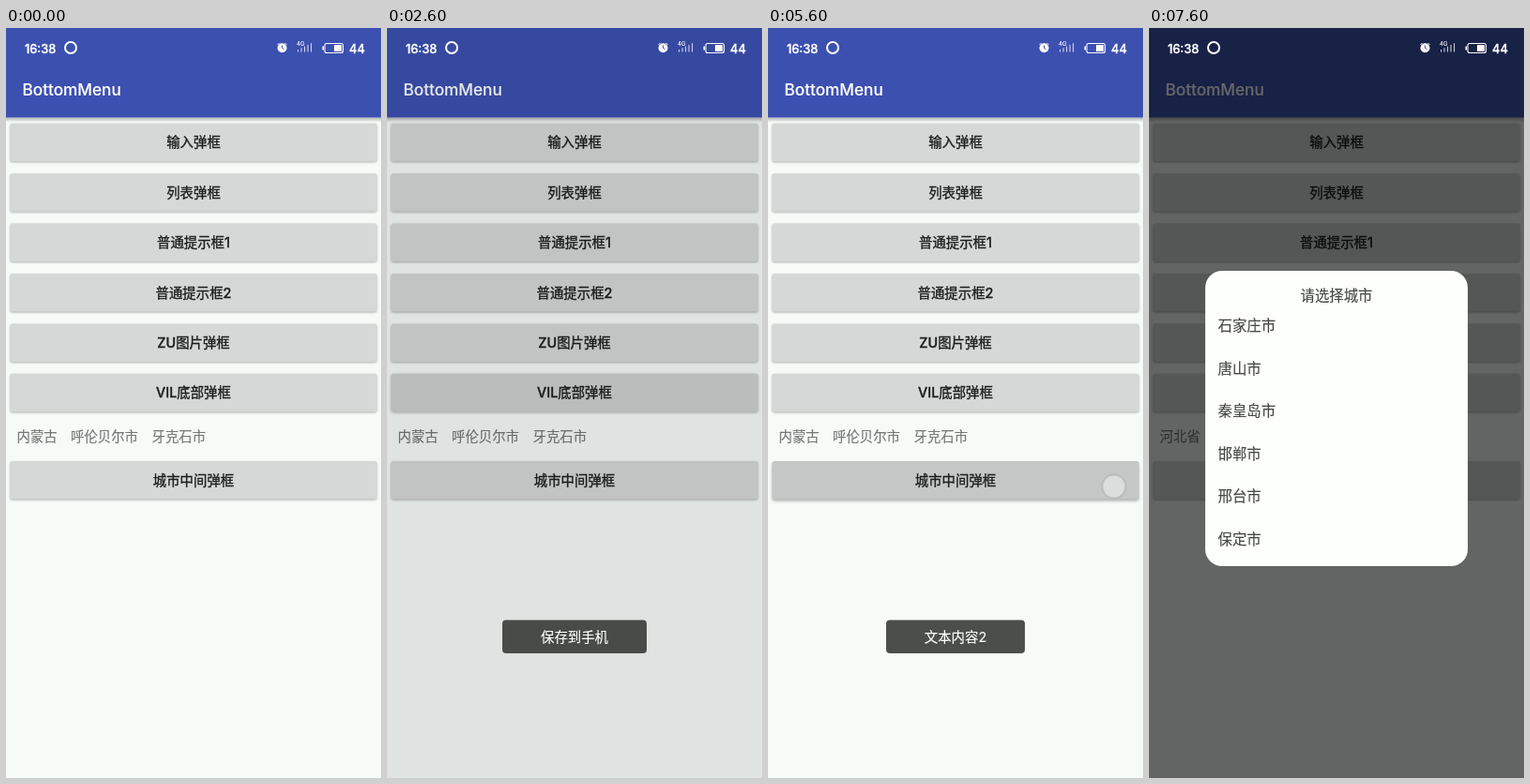
An HTML page for the animation above (8000 ms loop, 400 by 800 pixels).

```html
<!DOCTYPE html>
<html lang="zh-CN">
<head>
<meta charset="utf-8">
<title>BottomMenu</title>
<style>
  html, body { margin: 0; width: 100%; height: 100%; overflow: hidden; background: #f6fbf8; }
  svg { display: block; width: 400px; height: 800px; }
  text { font-family: Inter, "Noto Sans CJK SC", "Noto Sans CJK", "Noto Sans CJK JP", sans-serif;
    white-space: pre; stroke-width: .15px; }
  .medium { font-weight: 500; stroke-width: .35px; }
</style>
</head>
<body>
<svg id="stage" viewBox="0 0 400 800" xmlns="http://www.w3.org/2000/svg"></svg>
<script>
const LOOP = 8000, STEP = 200;
const PAPER = '#fdfffd', PANEL = '#eceeec', BLUE = '#447bcc', INK = '#464846', NAVY = '#3c50b0';

const rect = (x, y, w, h, fill, r = 0, extra = '') =>
  `<rect x="${x}" y="${y}" width="${w}" height="${h}" rx="${r}" fill="${fill}" ${extra}/>`;

// y is the optical middle of the line
const label = (s, x, y, size, fill, anchor = 'middle', extra = '') =>
  `<text x="${x}" y="${y + size * 0.37}" font-size="${size}" fill="${fill}" stroke="${fill}" text-anchor="${anchor}" ${extra}>${s}</text>`;

const group = (id, body) => `<g id="${id}">${body}</g>`;

const buttonNames = ['输入弹框', '列表弹框', '普通提示框1', '普通提示框2', 'ZU图片弹框', 'VIL底部弹框', '城市中间弹框'];

function button(name, i) {
  const y = i < 6 ? 101.8 + i * 53.4 : 462;
  return rect(4.5, y, 391, 40.5, '#d6d8d7', 2, `id="button${i}"`) +
    rect(4.5, y, 391, 40.5, '#000', 2, `id="press${i}" opacity="0"`) +
    label(name, 200, y + 20.2, 14.4, '#1d1f1e', 'middle', 'class="medium"');
}

function page() {
  const place = (id, s, x) => label(s, x, 435.5, 14.4, '#737876', 'start', `id="${id}"`);
  return rect(0, 0, 400, 800, '#f6fbf8') +
    rect(0, 95.5, 400, 5, 'url(#drop)') +
    rect(0, 0, 400, 95.5, NAVY) +
    label('BottomMenu', 17.5, 65.3, 17.2, '#fff', 'start', 'font-weight="500"') +
    buttonNames.map(button).join('') +
    place('province', '内蒙古', 11.5) + place('city', '呼伦贝尔市', 69) + place('district', '牙克石市', 155.5);
}

function photoSheet() {
  const rows = ['发送给好友', '转载到空间相册', '群相册', '保存到手机', '提取图中文字', '收藏'];
  return rect(0, 461, 400, 339, PAPER) +
    rows.map((s, i) => label(s, 200, 484 + i * 47, 16.6, INK) +
      (i ? rect(0, 460 + i * 47, 400, 1, PANEL) : '')).join('') +
    rect(0, 743, 400, 7, '#e9ebe9') +
    label('取消', 200, 775, 16.6, INK);
}

function cardSheet() {
  const rows = [0, 1, 2, 3].map(i => label('文本内容' + i, 200, 575 + i * 46, 15.4, BLUE) +
    (i ? rect(7.5, 551 + i * 46, 385.5, 1, '#e8eae9') : ''));
  return rect(7.5, 505, 385.5, 230, PAPER, 6) +
    rect(7.5, 505, 385.5, 47, PANEL, 6) + rect(7.5, 540, 385.5, 12, PANEL) +
    label('标题', 200, 528, 16.2, '#b81c1c', 'middle', 'class="medium"') + rows.join('') +
    rect(7.5, 743, 385.5, 50, PANEL, 6) +
    label('取消', 200, 768, 16.2, BLUE);
}

const dialog = (title, rows) => rect(60, 259, 280, 315, PAPER, 18) +
  label(title, 200, 285, 15.4, INK) +
  rows.map((s, i) => label(s, 73.5, 317.5 + i * 45.5, 15.4, INK, 'start')).join('');

const toast = (s, w) => rect(200 - w / 2, 631.5, w, 35.5, '#2f342f', 4, 'opacity=".86"') +
  label(s, 200, 649.3, 14.4, '#fff');

function statusBar() {
  const digits = (s, x) => label(s, x, 22.3, 12.8, '#fff', 'start', 'class="medium"');
  const bars = [0, 1, 2, 3, 4].map(i =>
    rect(311 + i * 3.5, 23 - i * 1.7, 1.1, 2.5 + i * 1.7, '#fff', 0, 'opacity=".75"')).join('');
  return digits('16:38', 20) +
    '<circle cx="69" cy="21" r="6" fill="none" stroke="#fff" stroke-width="2"/>' +
    '<circle cx="294.5" cy="21.3" r="5" fill="#fff"/>' +
    '<path d="M289.5 18l2-2M299.5 18l-2-2" stroke="#fff"/>' +
    `<path d="M294.5 18.5v3l2 1" fill="none" stroke="${NAVY}"/>` +
    label('4G', 310, 16.5, 6, '#fff', 'start') + bars +
    rect(340, 16.5, 19.5, 10, 'none', 2, 'stroke="#fff" stroke-width="1.1"') +
    rect(350, 18, 8, 7, '#fff', 0.5) + rect(337.5, 19.5, 1.5, 4, '#fff') +
    digits('44', 366);
}

const stage = document.getElementById('stage');
stage.innerHTML =
  `<defs><linearGradient id="drop" x2="0" y2="1"><stop stop-color="#000" stop-opacity=".28"/>
   <stop offset="1" stop-color="#000" stop-opacity="0"/></linearGradient></defs>` +
  page() + rect(0, 0, 400, 800, '#000300', 0, 'id="dim"') +
  group('photo', photoSheet()) + group('card', cardSheet()) +
  group('provinces', dialog('请选择省份', ['北京市', '天津市', '河北省', '山西省', '内蒙古', '辽宁省'])) +
  group('cities', dialog('请选择城市', ['石家庄市', '唐山市', '秦皇岛市', '邯郸市', '邢台市', '保定市'])) +
  group('saved', toast('保存到手机', 154)) + group('chosen', toast('文本内容2', 148)) +
  statusBar() +
  group('touch', '<circle r="12.5" fill="#fff" fill-opacity=".4" stroke="#aaaeac" stroke-opacity=".55" stroke-width="2"/>');

const el = id => document.getElementById(id);
const set = (id, name, value) => el(id).setAttribute(name, value);

const windows = [
  { id: 'photo', open: 500, close: 1600, height: 339 },
  { id: 'card', open: 2500, close: 4100, height: 295 },
  { id: 'provinces', open: 5600, close: 7000 },
  { id: 'cities', open: 7000, close: LOOP }
];
const toasts = [{ id: 'saved', open: 1900 }, { id: 'chosen', open: 4500 }];
const TOAST_LIFE = 1700;

const taps = [
  { time: 200, x: 280, y: 342, button: 4 },
  { time: 1400, x: 266.5, y: 629 },
  { time: 2400, x: 300, y: 395, button: 5 },
  { time: 4000, x: 285, y: 670 },
  { time: 5600, x: 369, y: 489, button: 6 },
  { time: 6800, x: 220, y: 411 }
];

// Every transition is a 400 ms smoothstep
function ramp(t, start) {
  const p = Math.min(1, Math.max(0, (t - start) / 400));
  return p * p * (3 - 2 * p);
}
const shown = (t, open, close) => ramp(t, open) - ramp(t, close);

function render(t) {
  let dim = 0;
  for (const { id, open, close, height } of windows) {
    const v = shown(t, open, close);
    dim += v;
    if (height) {
      // a sheet starts to rise just after the shade
      set(id, 'transform', `translate(0 ${height * (1 - shown(t, open + 100, close))})`);
    } else {
      set(id, 'opacity', v);
      set(id, 'transform', `translate(200 416.5) scale(${0.92 + 0.08 * v}) translate(-200 -416.5)`);
    }
  }
  set('dim', 'opacity', 0.6 * dim);

  for (const { id, open } of toasts) set(id, 'opacity', shown(t, open, open + TOAST_LIFE));

  for (const { time, button } of taps) {
    if (button === undefined) continue;
    const force = t < time ? 0 : 1 - ramp(t, time);
    set('press' + button, 'opacity', 0.08 * force);
    el('button' + button).style.filter = shadow(force);
  }

  const picked = t >= 7200;
  el('province').textContent = picked ? '河北省' : '内蒙古';
  for (const id of ['city', 'district']) set(id, 'opacity', picked ? 0 : 1);

  const tap = taps.find(p => t >= p.time && t < p.time + STEP);
  set('touch', 'opacity', tap ? 1 : 0);
  if (tap) set('touch', 'transform', `translate(${tap.x} ${tap.y})`);
}

const shadow = force => `drop-shadow(0 ${1 + force}px ${1 + force * 0.8}px rgba(0,0,0,.3))`;
buttonNames.forEach((_, i) => el('button' + i).style.filter = shadow(0));

const start = performance.now();
function tick() {
  const t = (performance.now() - start) % LOOP;
  render(Math.floor(t / STEP) * STEP);
  requestAnimationFrame(tick);
}
tick();
</script>
</body>
</html>
```
